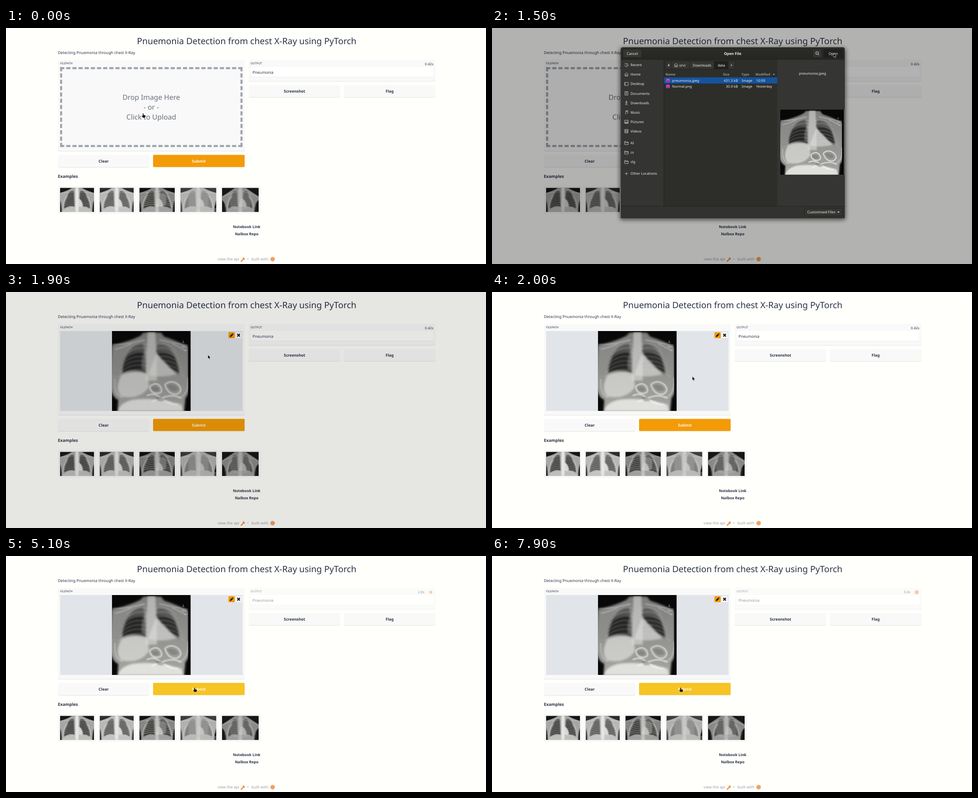
An HTML page that plays this animation: 1064 px wide and 526 px high, repeating every 8000 ms.

```html
<!DOCTYPE html>
<html lang="en">
<head>
<meta charset="utf-8">
<title>Chest X-Ray demo</title>
<style>
  html, body { margin: 0; width: 100%; height: 100%; overflow: hidden; background: #fffffc; }
  svg { display: block; }
  text { font-family: "Noto Sans", "Open Sans", sans-serif; text-rendering: geometricPrecision; white-space: pre; }
</style>
</head>
<body>
<svg id="stage" width="1064" height="526" viewBox="0 0 1064 526"></svg>
<script>
const LOOP = 8000, STEP = 100;
const INK = '#2a3245', ORANGE = '#f39b07', LIGHT = '#eeeeec';

const rect = (x, y, w, h, fill, rx = 0, extra = '') =>
  `<rect x="${x}" y="${y}" width="${w}" height="${h}" rx="${rx}" fill="${fill}" ${extra}/>`;
const path = (d, fill = 'none', stroke = 'none', width = 1, extra = '') =>
  `<path d="${d}" fill="${fill}" stroke="${stroke}" stroke-width="${width}" ${extra}/>`;
const group = (content, extra = '') => `<g ${extra}>${content}</g>`;
const glow = (d, fill, opacity) => path(d, fill, 'none', 0, `opacity="${opacity}"`);

// Text centred vertically on cy.
function label(x, cy, size, str, { fill = INK, anchor = 'start', bold = false, id = '' } = {}) {
  return `<text x="${x}" y="${(cy + size * 0.36).toFixed(2)}" font-size="${size}" fill="${fill}"` +
    ` text-anchor="${anchor}" font-weight="${bold ? 700 : 400}" ${id && `id="${id}"`}>${str}</text>`;
}

const card = (x, y, w, h, fill = '#f8f9f8') =>
  rect(x, y + 0.9, w, h, '#e3e5e4', 2.5) + rect(x, y, w, h, fill, 2.5);

const button = (x, y, str) => card(x, y, 203, 27) +
  label(x + 101.5, y + 13.5, 8.6, str, { anchor: 'middle', bold: true });

// Dashes twice the line width that start and end flush with the side.
function dashedSide(x1, y1, x2, y2, count) {
  const len = Math.hypot(x2 - x1, y2 - y1), dash = 9.2;
  const gap = (len - count * dash) / (count - 1);
  return path(`M${x1} ${y1}L${x2} ${y2}`, 'none', '#9da4ae', 4.5, `stroke-dasharray="${dash} ${gap}"`);
}

function ribs(count, top, step, color, opacity, width = 1.4) {
  let d = '';
  for (let i = 0; i < count; i++) {
    const y = top + i * step, reach = 27 + i * 1.8;
    d += `M46 ${y}Q${46 - reach * 0.6} ${y - 5} ${46 - reach} ${y + 8}`;
    d += `M54 ${y}Q${54 + reach * 0.6} ${y - 5} ${54 + reach} ${y + 8}`;
  }
  return path(d, 'none', color, width, `opacity="${opacity}"`);
}

const bigXray = `<symbol id="xray" viewBox="0 0 100 100" preserveAspectRatio="none">
  ${rect(0, 0, 100, 100, '#080808')}
  ${group(
    path('M0 18Q22 13 36 6L40 2H62L66 7Q82 12 97 20V58Q100 76 93 84L91 104H7L8 86Q-2 82 -2 62Z', 'url(#body)') +
    glow('M0 20Q20 15 38 8L42 13Q24 15 14 34L11 56H0Z', '#8d8d8b', 0.5) +
    path('M39 15Q19 17 13 46L13 53Q28 47 43 52Q44 30 39 15Z', '#262626') +
    path('M58 16Q78 15 85 48L85 54Q74 49 67 39Q58 33 56 26Z', '#2e2e2e') +
    glow('M40 15Q25 15 18 31Q32 22 42 27ZM58 16Q74 15 80 32Q68 23 57 26Z', '#8a8a88', 0.5),
    'filter="url(#soft)"')}
  ${group(
    ribs(7, 17, 5.4, '#c4c4c2', 0.16, 1.8) +
    path('M1 17Q20 17 42 11M96 18Q78 15 60 11M4 23Q16 20 25 16M94 25Q84 19 76 16', 'none', '#d8d8d6', 1.6, 'opacity=".4"'),
    'filter="url(#faint)"')}
  ${group(
    glow('M45 0H55L57 62H43Z', '#f4f4f2', 0.45) +
    glow('M42 24Q36 34 38 48L45 50V22ZM55 26L62 34Q56 40 55 44Z', '#b4b4b2', 0.4) +
    glow('M56 28Q68 42 82 54Q62 59 46 55Z', '#dededc', 0.6) +
    glow('M12 55Q29 48 45 54L47 70Q36 86 12 82Q3 72 12 55Z', '#e4e4e1', 0.65) +
    glow('M8 100Q10 90 26 86Q55 82 88 92L90 100Z', '#f4f4f2', 0.75),
    'filter="url(#soft)"')}
  ${group(
    path('M48 69Q56 63 61 69Q66 77 58 78Q48 78 48 69M67 67Q75 60 84 67Q91 75 82 79Q71 80 67 67M63 84Q76 78 88 84M50 89Q60 82 76 91M44 81Q54 76 62 84T84 92',
      'none', '#fbfbf8', 1.8, 'opacity=".6"') +
    glow('M49 71Q58 67 60 74Q54 79 49 71M70 68Q80 65 84 73Q76 79 70 68M55 83Q62 80 66 87Q58 90 55 83', '#6a6a68', 0.4) +
    path('M4 60Q2 79 13 83M96 58Q98 80 84 84', 'none', '#eee', 1, 'opacity=".5"'),
    'filter="url(#faint)"')}
  ${rect(0, 0, 100, 1.2, '#080808')}
  ${path('M98 0V100', 'none', '#050505', 3)}
  ${path('M99.7 0V100', 'none', '#aaa', 0.6)}
  ${label(89.6, 13, 4, 'L', { fill: '#fff' })}
  ${path('M88 18.5H94M89 20H95M92 24H94.5', 'none', '#ddd', 0.6, 'stroke-dasharray="1.2 .5"')}
</symbol>`;

// slope: how far the shoulders drop; narrow: inset of the chest sides.
function thumb(x, w, { body, lung, edge, rib = 0.25, narrow = 0, slope = 22, spine = 0.7, haze = 0 }) {
  const a = 12 + narrow, b = 88 - narrow;
  return rect(x - 4.5, 352, w + 9, 62, '#f7f8f8', 2) +
    `<svg x="${x - 0.3}" y="356.2" width="${w + 0.3}" height="53.8" viewBox="0 0 100 100" preserveAspectRatio="none">
    ${rect(0, 0, 100, 100, edge)}
    ${group(
      path(`M-2 ${slope}Q25 12 38 -2H62Q76 12 102 ${slope}V50Q${b + 8} 56 ${b + 7} 102H${a - 7}Q${a - 8} 56 -2 50Z`, body) +
      path(`M41 13Q26 8 ${a + 9} 38Q${a - 1} 62 ${a} 86Q28 70 43 78Z`, lung) +
      path(`M59 13Q74 8 ${b - 9} 38Q${b + 1} 62 ${b} 86Q76 72 66 79Q66 56 57 46Z`, lung),
      'filter="url(#soft)"')}
    ${group(
      ribs(8, 15, 8, '#e8e8e6', rib, 2) +
      path(`M2 ${slope}Q24 20 44 16M98 ${slope}Q76 20 56 16M${a - 3} 92Q${a - 5} 60 ${a + 6} 36M${b + 3} 92Q${b + 5} 60 ${b - 6} 36`,
        'none', '#eee', 2, 'opacity=".35"'),
      'filter="url(#faint)"')}
    ${group(
      rect(45, -3, 10, 106, '#f6f6f4', 3, `opacity="${spine}"`) +
      glow('M52 42Q66 50 68 80L46 78Z', '#e4e4e2', spine) +
      glow(`M${a - 4} 92Q28 74 44 80L50 102H${a - 6}ZM${b + 4} 92Q76 76 56 80L50 102H${b + 6}Z`, '#d0d0ce', spine * 0.7) +
      rect(22, 10, 56, 80, '#bbb', 20, `opacity="${haze}"`),
      'filter="url(#soft)"')}
    </svg>`;
}

const examples =
  thumb(120, 75, { body: '#a6a6a4', lung: '#484846', edge: '#161616', spine: 0.8 }) +
  thumb(208, 75, { body: '#b8b8b6', lung: '#626260', edge: '#2c2c2c', spine: 0.75 }) +
  thumb(296, 78, { body: '#868684', lung: '#3a3a38', edge: '#101010', rib: 0.45, spine: 0.5 }) +
  rect(335, 368, 20, 30, '#c6c6c3', 8, 'opacity=".4" filter="url(#soft)"') +
  thumb(387, 79, { body: '#b0b0ae', lung: '#7c7c7a', edge: '#3c3c3c', rib: 0.12, spine: 0.4, haze: 0.3 }) +
  path('M466 391L462 400L466 401Z', '#111') +
  thumb(479, 81, { body: '#888886', lung: '#4c4c4a', edge: '#161616', rib: 0.14, narrow: 6, slope: 38, spine: 0.4, haze: 0.2 });

const wrench = path('M520.3 519.2L525 514.5Q524.2 511.6 527 510.8L528.4 510.7L526.8 512.7L528 514L530 512.4Q530.3 516.4 526.8 516.3L522 521.1Q519.6 521.7 520.3 519.2Z', '#ee8a3c');

const page = rect(0, 0, 1064, 526, '#fffffc') +
  label(533.5, 28.7, 19.35, 'Pnuemonia Detection from chest X-Ray using PyTorch', { anchor: 'middle' }) +
  label(115, 55, 8.6, 'Detecting Pnuemonia through chest X-Ray') +
  card(115, 71, 414, 203) +
  label(120, 79, 6.35, 'FILEPATH') +
  group(
    dashedSide(120, 89.5, 524, 89.5, 30) + dashedSide(120, 263, 524, 263, 30) +
    dashedSide(122.2, 87.2, 122.2, 265.2, 13) + dashedSide(522, 87.2, 522, 265.2, 13) +
    ['Drop Image Here', '- or -', 'Click to Upload'].map((s, i) =>
      label(322, 154.2 + i * 22.2, 15.7, s, { anchor: 'middle', fill: '#6b717d' })).join(''),
    'id="drop"') +
  group(
    rect(120, 87, 404.5, 178, '#e1e4e8') +
    '<use href="#xray" x="234.8" y="87" width="175.2" height="178.2"/>' +
    rect(493, 89.5, 14, 13.5, ORANGE, 2) +
    path('M496.2 100.2L496.8 97.4L501 93.2L503.3 95.5L499.1 99.7ZM501.6 92.6L502.4 91.9L504.7 94.1L503.9 94.9Z', '#111') +
    rect(508.6, 89.5, 14, 13.5, '#f6f7f6', 2) +
    path('M512.7 93.4L518.5 99.3M518.5 93.4L512.7 99.3', 'none', '#111', 2.3),
    'id="photo"') +
  group(
    card(538, 71, 414, 47.5) + label(542, 79, 6.45, 'OUTPUT') +
    rect(542, 87.8, 405.5, 22.3, '#e6e7e7', 2) + rect(542, 87, 405.5, 22.3, '#fffffe', 2) +
    label(546.5, 98.4, 8.6, 'Pneumonia'), 'id="output"') +
  label(947.3, 80.5, 7.6, '0.42s', { anchor: 'end', id: 'clock' }) +
  `<circle id="loader" cx="941.5" cy="80.8" r="4" fill="#f8cba8"/>` +
  button(538, 127, 'Screenshot') + button(749, 127, 'Flag') + button(115, 283, 'Clear') +
  rect(326, 283.4, 203, 27, '#eadfc4', 2) +
  rect(326, 282.8, 203, 27, ORANGE, 2, 'id="submit"') +
  label(427.5, 296.5, 8.6, 'Submit', { anchor: 'middle', bold: true, fill: '#fff8ea' }) +
  label(115, 331, 9.4, 'Examples', { bold: true }) + examples +
  label(533.5, 443, 8.3, 'Notebook Link', { anchor: 'middle', bold: true }) +
  label(533.5, 459, 8.3, 'Nalbox Repo', { anchor: 'middle', bold: true }) +
  label(469, 515, 8.6, 'view the api', { fill: '#9b9fa8' }) + wrench +
  label(536, 515, 8.6, '•', { fill: '#9b9fa8', anchor: 'middle' }) +
  label(544, 515, 8.6, 'built with', { fill: '#9b9fa8' }) +
  '<circle cx="591" cy="515.3" r="5" fill="#f2a163"/>';

// Side bar icons, drawn around 0,0.
const folder = 'M-4 3.5V-3.5H-1L0 -2H4V3.5ZM-4 -1H4';
const house = 'M-4.3 0L0 -4L4.3 0M-3 -.8V3.8H-1V1H1V3.8H3V-.8';
const icon = (x, y, d) => path(d, 'none', '#d0d0cc', 0.85, `transform="translate(${x} ${y})"`);
const places = [
  ['Recent', 82.5, 'M-3.8 0A3.8 3.8 0 1 0 -2.7 -2.7L-4 -3.6M0 -2V.4L2 1.4'],
  ['Home', 103.5, house],
  ['Desktop', 124.6, 'M-4 -3.5H4V3.5H-4ZM-3 -3V3'],
  ['Documents', 145.7, 'M-3.3 -4H3.3V4H-3.3ZM-1.7 -2H1.7M-1.7 0H1.7M-1.7 2H.5'],
  ['Downloads', 166.9, 'M-.8 -4H.8V0H2.2L0 2.3L-2.2 0H-.8ZM-3 3.9H3'],
  ['Music', 188, 'M-1.5 3V-3.5L3 -4V2M-1.5 -2L3 -2.5M-3.2 3H-1.5M1.3 2.2H3'],
  ['Pictures', 209, 'M-4 -3.5H4V3.5H-4ZM-3 2.5L-1 -.5L.5 1.3L2 0L3 2.5ZM1.5 -1.8H2.5'],
  ['Videos', 230, 'M-3.5 -3.8H3.5V3.8H-3.5ZM-1.8 -3.8V3.8M1.8 -3.8V3.8M-1.8 0H1.8'],
  ['AI', 256.3, folder], ['cs', 277.5, folder], ['clg', 298.6, folder],
  ['Other Locations', 324.6, 'M-3.2 0H3.2M0 -3.2V3.2']
].map(([name, y, d]) => icon(298, y, d) + label(307, y, 7.85, name, { fill: LIGHT })).join('');

const gtkButton = (x, y, w, h, id = '') =>
  rect(x, y, w, h, '#353532', 2.5, `stroke="#1d1d1b" stroke-width=".8" ${id && `id="${id}"`}`);

const column = (x, str) => label(x, 103, 7.4, str, { fill: '#969691', bold: true });

const file = (y, name, size, when) =>
  rect(386, y - 3.8, 8, 7.6, '#c04bc4', 1) +
  path(`M387 ${y + 2.5}L389.5 ${y - 1}L391 ${y + 1}L392 ${y}L393 ${y + 2.5}Z`, '#7c2a92') +
  label(399, y, 7.8, name, { fill: LIGHT }) +
  label(545, y, 7.8, size, { fill: LIGHT, anchor: 'end' }) +
  label(553.5, y, 7.8, 'Image', { fill: LIGHT }) +
  label(585.5, y, 7.8, when, { fill: LIGHT });

const dialog = rect(283, 44, 501, 384, '#000', 6, 'opacity=".55" filter="url(#shadow)"') +
  path('M285.5 424V48Q285.5 43 290.5 43H777Q782 43 782 48V424Z', '#2d2d2a') +
  path('M286 70V48Q286 43.5 290.5 43.5H777Q781.5 43.5 781.5 48V70Z', 'url(#bar)') +
  rect(286, 70, 95, 327, '#343432') + rect(632.5, 70, 149, 327, '#353533') +
  rect(286, 397, 495.5, 26.5, '#323230') +
  path('M286 70H781.5M286 397.3H781.5M381 70V397', 'none', '#1e1e1c', 0.8) +
  gtkButton(290, 47.5, 42, 18.5) + label(311, 56.8, 7.95, 'Cancel', { fill: LIGHT, anchor: 'middle' }) +
  label(533.5, 56.8, 8.2, 'Open File', { fill: LIGHT, anchor: 'middle', bold: true }) +
  gtkButton(711, 47.5, 20, 18.5) +
  path('M722.8 58.3L725 60.4M723.7 56A3 3 0 1 0 717.7 56A3 3 0 1 0 723.7 56', 'none', LIGHT, 1) +
  gtkButton(735.5, 47.5, 42, 18.5, 'open') + label(756.5, 56.8, 7.95, 'Open', { fill: LIGHT, anchor: 'middle' }) +
  places +
  gtkButton(384.5, 74, 153.5, 17.5) + rect(492.3, 74.3, 31.5, 17, '#20201e') +
  path('M398.3 74V91.5M438.3 74V91.5M492.3 74V91.5M523.8 74V91.5', 'none', '#1d1d1b', 0.8) +
  path('M392.8 80.5V85.5L389.7 83Z', LIGHT) + path('M529.7 80.5V85.5L532.8 83Z', '#aaa') +
  icon(408, 83, house) +
  label(415, 83, 7.85, 'orvi', { fill: LIGHT }) + label(445, 83, 7.85, 'Downloads', { fill: LIGHT }) +
  label(508.5, 83, 7.85, 'data', { fill: '#fff', anchor: 'middle' }) +
  column(384.5, 'Name') + column(512, 'Size') + column(553, 'Type') + column(584, 'Modified') +
  path('M622.3 104.3H627.3L624.8 101.5Z', '#a5a5a0') +
  rect(381.3, 110, 251.2, 13.7, '#15539e') +
  file(117, 'pneumonia.jpeg', '431.3 kB', '10:09') + file(130.2, 'Normal.png', '30.9 kB', 'Yesterday') +
  label(710.5, 101, 7.8, 'pneumonia.jpeg', { fill: LIGHT, anchor: 'middle' }) +
  '<use href="#xray" x="639" y="182" width="142" height="145"/>' +
  gtkButton(693, 402, 84, 17) + label(699, 410.5, 7.9, 'Customised Files', { fill: LIGHT }) +
  path('M765.5 409.2H770.5L768 412Z', LIGHT);

const blur = (id, dev) => `<filter id="${id}" x="-20%" y="-20%" width="140%" height="140%"><feGaussianBlur stdDeviation="${dev}"/></filter>`;
const fade = (id, from, to) =>
  `<linearGradient id="${id}" x2="0" y2="1"><stop stop-color="${from}"/><stop offset="1" stop-color="${to}"/></linearGradient>`;

const stage = document.getElementById('stage');
stage.innerHTML = `<defs>${blur('soft', 1.2)}${blur('faint', 0.5)}${blur('shadow', 5)}
  ${fade('body', '#7c7c7a', '#a8a8a5')}${fade('bar', '#2b2b28', '#262624')}${bigXray}</defs>` +
  page + rect(0, 0, 1064, 526, '#000', 0, 'id="dim"') + group(dialog, 'id="dialog"') +
  group(path('M0 0V9L2.1 7.1L3.5 10.3L5 9.6L3.6 6.6H6.3Z', '#0a0a0a', '#eee', 0.6), 'id="arrow"') +
  group(path('M0 1Q0 -.2 1 -.2Q2 -.2 2 1V3.6L5 4Q6.4 4.3 6.2 5.8L5.4 9.4H.6L-2.2 6Q-2.3 4.7 -1.2 5L0 5.9Z', '#0a0a0a', '#eee', 0.3), 'id="hand"');

const el = id => document.getElementById(id);
const parts = Object.fromEntries(
  ['drop', 'photo', 'output', 'clock', 'loader', 'submit', 'open', 'dim', 'dialog', 'arrow', 'hand'].map(id => [id, el(id)]));
const set = (id, attrs) => { for (const k in attrs) parts[id].setAttribute(k, attrs[k]); };
const show = (id, on) => set(id, { display: on ? 'inline' : 'none' });
const ramp = (t, start, length) => Math.min(1, Math.max(0, (t - start) / length));
const easeOut = p => 1 - (1 - p) ** 2;

// Pointer stops: time, x, y.
const stops = [
  [0, 303, 190.5], [750, 303, 190.5], [1100, 757, 56], [1700, 757, 56], [1800, 449, 119],
  [1900, 447.5, 140], [2000, 444, 188], [2100, 444, 188], [2300, 434, 236], [2500, 417, 292],
  [2600, 417, 292], [2700, 417, 293.5]
];

function pointer(t) {
  const next = stops.findIndex(s => s[0] > t);
  if (next < 0) return stops[stops.length - 1].slice(1);
  const [a, b] = [stops[next - 1], stops[next]];
  const p = (t - a[0]) / (b[0] - a[0]);
  return [a[1] + (b[1] - a[1]) * p, a[2] + (b[2] - a[2]) * p];
}

// The request timer stalls in a few places.
const stalls = [[3900, 4500], [6200, 6400], [7200, 7900]];

function elapsed(t) {
  if (t >= 7900) return 5;
  const stall = stalls.find(([from, to]) => t >= from && t < to);
  return Math.max(0, ((stall ? stall[0] : t) - 3100) / 1000);
}

function draw(t) {
  const picked = t >= 1700, pending = t >= 2900;
  show('drop', !picked);
  show('photo', picked);

  set('dim', { opacity: 0.3 * (ramp(t, 400, 560) - ramp(t, 1733, 250)) });
  const scale = easeOut(ramp(t, 440, 100)) - easeOut(ramp(t, 1717, 100));
  show('dialog', scale > 0.005);
  set('dialog', { transform: `translate(0 235.5) scale(1 ${scale}) translate(0 -235.5)` });
  set('open', { fill: t >= 1500 ? '#20201e' : t >= 1100 ? '#3a3a37' : '#353532' });

  const [x, y] = pointer(t);
  const overSubmit = t > 2000 && y >= 283, hand = t < 500 || overSubmit;
  set('submit', { fill: overSubmit ? '#f6c423' : ORANGE });
  show('hand', hand);
  show('arrow', !hand);
  set(hand ? 'hand' : 'arrow', { transform: `translate(${x} ${y})` });

  set('output', { opacity: pending ? 0.5 : 1 });
  set('clock', { x: pending ? 927.3 : 947.3, fill: pending ? '#93979f' : INK });
  parts.clock.textContent = pending ? elapsed(t).toFixed(1) + 's' : '0.42s';
  show('loader', pending);
  set('loader', { r: 3.9 - 0.6 * Math.cos((t - 5100) / 1120 * 2 * Math.PI) });
}

function tick() {
  const t = performance.now() % LOOP;
  draw(Math.floor(t / STEP) * STEP);
  requestAnimationFrame(tick);
}
tick();
</script>
</body>
</html>
```
